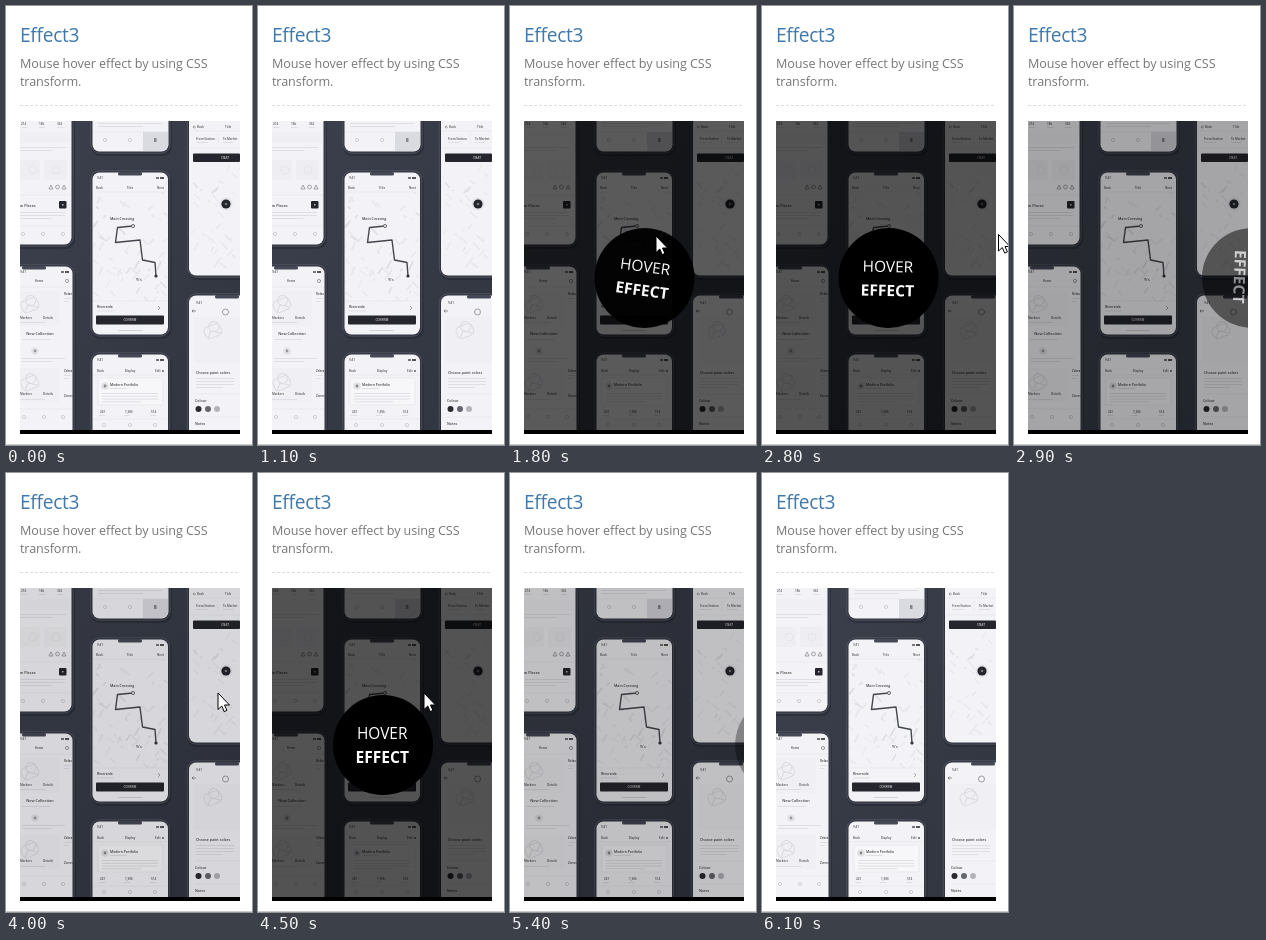
An HTML page that plays this animation: 246 px wide and 439 px high, repeating every 6.4 s.

```html
<!DOCTYPE html>
<html lang="en">
<head>
<meta charset="utf-8">
<title>Effect3</title>
<style>
html, body { margin: 0; width: 100%; height: 100%; overflow: hidden; background: #fff; }
svg { display: block; width: 246px; height: 439px; font-family: "Open Sans", "Noto Sans", sans-serif; }
</style>
</head>
<body>
<svg viewBox="0 0 246 439">
  <defs>
    <clipPath id="box"><rect x="14" y="115" width="220" height="313"/></clipPath>
    <clipPath id="pic"><rect x="14" y="115" width="220" height="309"/></clipPath>
    <linearGradient id="desk" x2="1" y2="1">
      <stop stop-color="#3d414d"/><stop offset="1" stop-color="#30343f"/>
    </linearGradient>
    <filter id="soft" filterUnits="userSpaceOnUse" x="0" y="100" width="250" height="339" color-interpolation-filters="sRGB">
      <feGaussianBlur stdDeviation=".45"/>
    </filter>
  </defs>
  <text x="13.9" y="36" font-size="19.2" letter-spacing="-.3" fill="#3f78a9">Effect3</text>
  <g font-size="12.6" letter-spacing="-.08" fill="#777">
    <text x="14" y="62">Mouse hover effect by using CSS</text>
    <text x="14" y="80">transform.</text>
  </g>
  <path d="M14 99.5H234" stroke="#ddd" stroke-dasharray="3 2"/>
  <path d="M0 438.5H246" stroke="#ccc"/>
  <g clip-path="url(#box)">
    <rect x="14" y="115" width="220" height="313"/>
    <g id="photo" clip-path="url(#pic)"><g id="scene" filter="url(#soft)"></g></g>
    <g id="badge" fill="#fff" text-anchor="middle">
      <circle cx="125" cy="272" r="50" fill="#000"/>
      <text x="124.2" y="266" font-size="15.4">HOVER</text>
      <text x="124.2" y="290" font-size="15.6" font-weight="700">EFFECT</text>
    </g>
  </g>
  <path id="cursor" d="M0 0V16.5L3.8 13L6.2 18.6L8.9 17.4L6.5 12H11.5Z" fill="#fff" stroke="#000"/>
</svg>
<script>
const $ = id => document.getElementById(id);

// drawing helpers, each returns markup
const rect = (x, y, w, h, fill, more = '') =>
  `<rect x="${x}" y="${y}" width="${w}" height="${h}" fill="${fill}" ${more}/>`;
const disc = (x, y, r, fill, more = '') => `<circle cx="${x}" cy="${y}" r="${r}" fill="${fill}" ${more}/>`;
const ring = (x, y, r, color) => disc(x, y, r, 'none', `stroke="${color}" stroke-width=".8"`);
const line = (d, color, w = 1) =>
  `<path d="${d}" fill="none" stroke="${color}" stroke-width="${w}" stroke-linejoin="round"/>`;
const rule = (x, y, x2) => line(`M${x} ${y}H${x2}`, '#e4e4e9', .7);
const label = (x, y, s, size = 3, fill = '#555', more = 'font-weight="600"') =>
  `<text x="${x}" y="${y}" font-size="${size}" fill="${fill}" ${more}>${s}</text>`;
const mid = 'text-anchor="middle" font-weight="600"';
const lines = (x, y, w, n, gap = 3) =>
  Array.from({ length: n }, (_, i) => rect(x, y + i * gap, i == n - 1 ? w * .7 : w, .9, '#dcdce2')).join('');

let seed = 7;
const rnd = () => (seed = seed * 16807 % 2147483647) / 2147483647;

// faint map: short street pieces scattered over an area
function map(x, y, w, h, n) {
  let s = '';
  for (let i = 0; i < n; i++) {
    const px = x + rnd() * w, py = y + rnd() * h;
    const a = (rnd() < .5 ? .5 : 2) + rnd() * .4, len = 3 + rnd() * 7;
    const dx = Math.cos(a) * len, dy = Math.sin(a) * len;
    s += line(`M${px.toFixed(1)} ${py.toFixed(1)}l${dx.toFixed(1)} ${dy.toFixed(1)}`,
      rnd() < .3 ? '#dedee3' : '#e8e8ec', 1 + rnd());
  }
  return `<svg x="${x}" y="${y}" width="${w}" height="${h}" viewBox="${x} ${y} ${w} ${h}">${s}</svg>`;
}

function phone(x, y, w, h) {
  return rect(x - 2, y, w + 6, h + 5, '#1f222c', 'rx="9" opacity=".45"') +
    rect(x - 2.2, y - 2.2, w + 4.4, h + 4.4, '#30343f', 'rx="9" stroke="#5a5f6c" stroke-width=".7"') +
    rect(x - .5, y - .5, w + 1, h + 1, '#f3f3f7', 'rx="7"');
}
const notch = (x, y) => rect(x + 6, y - 1, 24, 3.5, '#454955', 'rx="1.500"');
const status = (x, y, right) =>
  label(x, y, '9:41', 3) + rect(right - 8, y - 2, 3, 2, '#777') + rect(right - 4, y - 2, 4, 2, '#555');
const tabs = (y, xs) => xs.map(x => ring(x, y, 1.6, '#c4c4cb')).join('');
const blob = (x, y) => `<g transform="translate(${x} ${y}) rotate(-22)">` +
  rect(-9, -5, 17, 12, 'none', 'rx="4" stroke="#dadae0"') +
  disc(2, -3, 5, 'none', 'stroke="#dadae0"') + line('M-8 6L-2 0L6 6', '#dadae0') + '</g>';

const leftTop = phone(-12, 90, 77, 148) +
  label(15, 119, '214') + label(33, 119, '18k') + label(51, 119, '362') +
  lines(15, 121, 9, 1) + lines(33, 121, 9, 1) + lines(51, 121, 9, 1) +
  rect(14, 126, 50, 11, '#f0f0f4') + lines(14, 141, 46, 2) +
  rect(14, 154, 20, 20, '#eeeef2', 'rx="2"') + rect(38, 154, 23, 20, '#eeeef2', 'rx="2"') +
  ring(27, 164, 4, '#e2e2e7') + ring(50, 164, 4, '#e2e2e7') +
  line('M43 183l2-4l2 4z', '#8d8d95', .8) + ring(51.5, 181, 1.9, '#8d8d95') +
  line('M56 183l2-4l2 4z', '#8d8d95', .8) + rule(14, 189, 65) +
  label(9, 201, 'New Places', 3.8, '#444') + rect(53, 195, 7.5, 7.5, '#25262d', 'rx="1"') +
  rect(56, 198, 1.5, 1.5, '#bbb') + lines(14, 206, 45, 3) +
  rule(14, 220, 65) + tabs(228, [17, 37, 57]);

const leftLow = phone(-10, 261, 76, 190) + notch(10, 261) + status(14, 267, 63) +
  label(33, 276, 'Home', 3, '#555', mid) + ring(61, 275, 1.6, '#888') + rule(14, 281, 66) +
  rect(14, 285, 40, 35, '#f0f0f4') + blob(24, 298) +
  label(58, 289, 'Relax', 3, '#444') + lines(58, 292, 7, 2) +
  label(14, 313, 'Markers') + label(37, 313, 'Details') + lines(14, 316, 36, 1) +
  label(34, 329, 'New Collection', 3.8, '#444', mid) + lines(16, 333, 40, 1) +
  disc(29, 345, 3.8, '#e2e2e7') + disc(29, 345, 1.4, '#999') + lines(16, 352, 43, 2) +
  rect(14, 362, 40, 34, '#f0f0f4') + blob(24, 376) +
  label(58, 366, 'Zebra', 3, '#444') + lines(58, 369, 7, 2) +
  label(14, 389, 'Markers') + label(37, 389, 'Details') + lines(14, 393, 36, 1) +
  label(58, 391, 'Zones', 3, '#444') +
  rule(14, 403, 66) + tabs(411, [18, 38, 57]);

const midTop = phone(87, 80, 75, 65) + lines(92, 117, 64, 2) + rule(87, 126, 162) +
  `<path d="M137 126H162V138a7 7 0 0 1-7 7H137Z" fill="#dadae1"/>` +
  tabs(134, [99, 124]) + rect(148, 132, 2.5, 4, '#888');

const midPhone = phone(87, 167, 74.500, 161) +
  map(87, 186, 74.500, 109, 60) + notch(106, 167) + status(91, 173, 158) +
  label(90, 183, 'Back') + label(124, 183, 'Title', 3, '#555', mid) + label(151, 183, 'Next') +
  rule(87, 186, 161) +
  line('M127 220L111.500 221.500L109.500 236.500L134 234L136.500 254L149 256.500L150 270', '#45474f', 1.4) +
  disc(127, 220, 1.6, '#ddd', 'stroke="#666" stroke-width=".9"') + disc(150, 270, 1.6, '#333') +
  label(104, 214, 'Main Crossing', 3.6, '#444') + label(130, 275, "Yi's", 3.6, '#444') +
  rule(87, 295, 161) + label(91, 302, 'Riverside', 3.6, '#444') +
  lines(91, 304.500, 24, 1) + line('M152 300l2 2l-2 2', '#888', .7) +
  rect(90, 309.500, 68, 9, '#26272e', 'rx="1"') + label(124, 315, 'CONFIRM', 2.8, '#ccc', mid) +
  rect(112, 324, 24, .6, '#bbb');

const midLow = phone(87, 349, 74.500, 110) + notch(106, 349) + status(91, 355, 158) +
  label(91, 366, 'Back') + label(124, 366, 'Display', 3, '#555', mid) + label(149, 366, 'Edit') +
  disc(157, 365, .9, '#555') + rule(87, 369, 161) +
  rect(92, 372, 65, 27, '#f7f7fa', 'rx="1.500" stroke="#e4e4e9" stroke-width=".7"') +
  disc(99, 380, 3.8, '#e2e2e7') + disc(99, 380, 1.4, '#888') +
  label(104, 380, 'Modern Portfolio', 3.4, '#444') + lines(104, 382, 24, 1) +
  lines(96, 387, 56, 4, 2.8) +
  label(94, 407, '241') + label(119, 407, '1,386') + label(145, 407, '514') +
  [93, 118, 144].map(x => lines(x, 409, 9, 1)).join('') +
  rule(87, 413, 161) + tabs(419, [98, 124, 149]);

const rightTop = phone(183.500, 80, 76, 189) + map(184, 158, 50, 104, 36) +
  line('M187 121h3M188.500 119.500l-1.500 1.500l1.500 1.500', '#777', .6) +
  label(191, 122, 'Back') + label(219, 122, 'Title') + rule(184, 125, 234) +
  label(190, 134, 'From Station') + label(217, 134, 'To Market') + lines(190, 136, 17, 1) + lines(217, 136, 15, 1) +
  line('M212 128V139', '#e4e4e9', .7) + rule(184, 142, 234) +
  rect(187, 147.500, 47, 8.500, '#25262d', 'rx="1"') + label(219, 153, 'START', 2.8, '#ccc', mid) +
  disc(220, 198, 6.5, '#dcdce2', 'opacity=".6"') + disc(220, 198, 4.6, '#24252c') + disc(220, 198, 1.3, '#777');

const rightLow = phone(183.500, 290, 76, 160) + notch(203, 290) + status(190, 298, 246) +
  line('M190 305h-4M187.500 303.500l-1.500 1.500l1.500 1.500', '#666', .7) +
  ring(219.500, 306, 3, '#888') +
  rect(188, 311, 46, 46, '#f0f0f4') + blob(207, 324) +
  label(190, 368, 'Choose paint colors', 3.6, '#444') + lines(190, 372, 38, 4) +
  rule(189, 388, 234) + label(189, 396, 'Colour', 3.6, '#444') +
  disc(192.500, 403, 3, '#2a2b31') + disc(202, 403, 3, '#66676e') + disc(211, 403, 3, '#b4b4bb') +
  rule(189, 411, 234) + label(189, 419, 'Notes', 3.6, '#444');

$('scene').innerHTML = rect(0, 100, 250, 339, 'url(#desk)') +
  leftTop + leftLow + midTop + midPhone + midLow + rightTop + rightLow;

// CSS "ease" curve
function ease(x) {
  if (x <= 0) return 0;
  if (x >= 1) return 1;
  const curve = (a, b, u) => 3 * a * u * (1 - u) ** 2 + 3 * b * u * u * (1 - u) + u ** 3;
  let lo = 0, hi = 1;
  for (let i = 0; i < 24; i++) {
    const u = (lo + hi) / 2;
    if (curve(.25, .25, u) < x) lo = u; else hi = u;
  }
  return curve(.1, 1, lo);
}

const LOOP = 6400, STEP = 100, FADE = 350;
const hovers = [[1541, 2795], [3950, 5260]];      // enter, leave
const paths = [                                   // time, x, y
  [[1600, 184, 236], [1700, 158, 232], [1800, 146, 230], [2600, 146, 230], [2700, 190, 230], [2800, 236.5, 228.5], [2900, 250, 226]],
  [[3900, 237.5, 220.5], [4000, 212, 220], [4200, 180, 219], [4500, 166, 220], [4900, 166, 220], [5000, 163, 184], [5100, 161, 147], [5299, 161, 147]]
];

const hoverAt = t => hovers.reduce((p, [a, b]) =>
  p + ease((t - a) / FADE) - ease((t - b) / FADE), 0);

function cursorAt(t) {
  for (const p of paths)
    for (let i = 1; i < p.length; i++) {
      const [a, x, y] = p[i - 1], [b, u, v] = p[i];
      if (t >= a && t <= b) {
        const k = (t - a) / (b - a);
        return [x + (u - x) * k, y + (v - y) * k];
      }
    }
  return [-50, -50];
}

function draw() {
  const t = Math.floor(performance.now() % LOOP / STEP) * STEP;
  const p = hoverAt(t), q = 1 - p;
  $('photo').setAttribute('opacity', 1 - .66 * p);
  $('badge').setAttribute('opacity', p);
  $('badge').setAttribute('transform', `translate(${220 * q} 0) rotate(${180 * q} 125 272)`);
  $('cursor').setAttribute('transform', `translate(${cursorAt(t)})`);
  requestAnimationFrame(draw);
}
draw();
</script>
</body>
</html>
```
